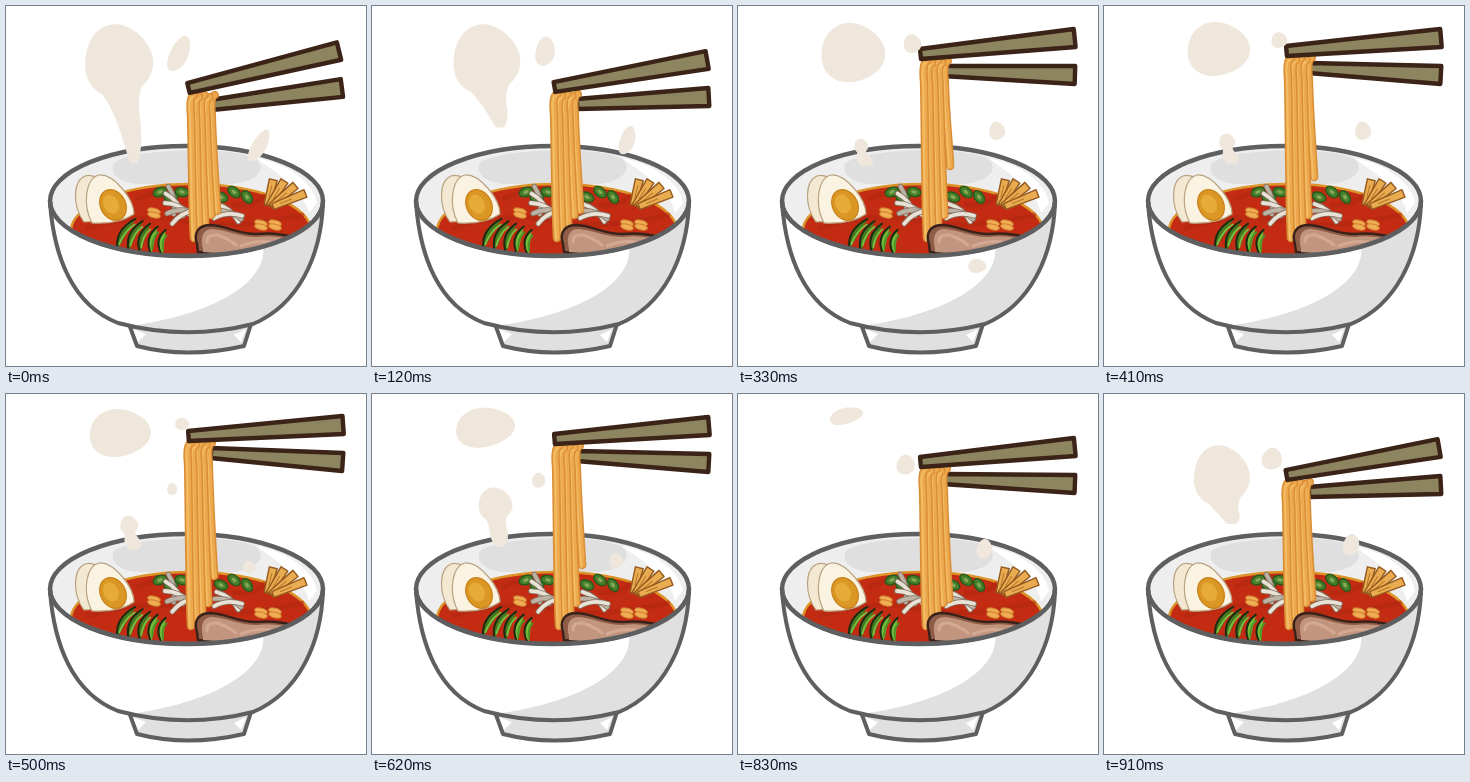
Write an HTML page that moves like this. It is 360 by 360 pixels and loops after 1 s.

```html
<!DOCTYPE html>
<html lang="en">
<head>
<meta charset="utf-8">
<title>Noodle bowl</title>
<style>
html, body { margin: 0; width: 100%; height: 100%; overflow: hidden; background: #fff; }
svg { display: block; width: 100%; height: 100%; }
</style>
</head>
<body>
<svg viewBox="0 0 360 360" fill="none" stroke-linecap="round" stroke-linejoin="round">
  <defs>
    <clipPath id="rimClip"><ellipse cx="180.5" cy="195" rx="136" ry="54"/></clipPath>
    <clipPath id="bodyClip"><path d="M44 197C48 250 66 299 112 317Q180 335 247 318C292 299 315 251 317 197A136.5 55 0 0 1 44 197Z"/></clipPath>
  </defs>

  <g id="inside" clip-path="url(#rimClip)">
    <rect x="40" y="138" width="280" height="114" fill="#eeeeef"/>
    <path d="M107 158C120 143 225 139 250 153C263 164 248 177 224 178H136C115 178 104 169 107 158Z" fill="#dfdfe0"/>
    <path d="M250 152C284 158 308 178 311 197L303 207C298 185 275 170 250 152Z" fill="#fff"/>
    <ellipse cx="185" cy="225" rx="120" ry="47" fill="#c32c13" stroke="#dc9428" stroke-width="2.5"/>
    <path d="M82 222Q135 205 180 215T296 209M132 193Q150 184 170 183M228 199Q250 200 258 190" stroke="#b02611" stroke-width="5" opacity=".5"/>
  </g>
  <ellipse cx="180.5" cy="195" rx="136.5" ry="55" stroke="#5e5f61" stroke-width="4.4"/>

  <g id="egg" stroke="#b8a380" stroke-width="1.2">
    <path d="M78 216C66 200 67 175 79 170C93 166 110 186 113 214Z" fill="#f3e8d2"/>
    <path d="M86 217C76 198 80 172 93 169C108 168 128 193 128 208C118 215 103 218 86 217Z" fill="#fbf3e2"/>
    <ellipse cx="107" cy="199" rx="12.5" ry="16" transform="rotate(-28 107 199)" fill="#da9723" stroke="#c9821b"/>
    <ellipse cx="105" cy="198" rx="7.5" ry="10" transform="rotate(-28 105 198)" fill="#e6ab38" stroke="none"/>
  </g>
  <g id="toppings"></g>

  <path id="lower" d="M0-5L132-9V9L0 5Z" fill="#8c855f" stroke="#3b2317" stroke-width="4.4"/>
  <g id="noodles"></g>
  <path id="upper" d="M0-5L155-9V9L0 5Z" fill="#8c855f" stroke="#3b2317" stroke-width="4.4"/>

  <g id="meat">
    <path d="M191 238C187 226 193 219 205 219C221 220 232 228 250 228Q270 226 287 231L268 243Q230 251 192 246Z" fill="#8f5d47" stroke="#39221a" stroke-width="2.4"/>
    <path d="M197 243C194 230 197 223 207 223C221 224 233 231 251 231Q268 229 282 233L262 243Q228 249 197 246Z" fill="#c2957f"/>
    <path d="M201 236Q201 228 211 229Q223 233 230 239M235 240Q249 234 264 236" stroke="#d3a994" stroke-width="3"/>
  </g>

  <g id="bowl">
    <path d="M123 318L131 340Q181 353 238 340L245 318Z" fill="#e1e0e0" stroke="#5e5f61" stroke-width="4"/>
    <path d="M127 323L140 328L132 336ZM228 329L240 323L235 336Z" fill="#fff"/>
    <g clip-path="url(#bodyClip)">
      <rect x="40" y="190" width="280" height="150" fill="#fff"/>
      <path d="M318 198Q295 232 257 240C262 277 206 309 124 320L180 340L260 328L320 260Z" fill="#e1e0e0"/>
    </g>
    <path d="M44 197C48 250 66 299 112 317Q180 335 247 318C292 299 315 251 317 197" stroke="#5e5f61" stroke-width="4"/>
    <path d="M44 195A136.5 55 0 0 0 317 195" stroke="#5e5f61" stroke-width="4.4"/>
  </g>
  <path id="steam" fill="#efe7dc"/>
</svg>

<script>
const $ = id => document.getElementById(id);
const repeat = (n, draw) => Array.from({ length: n }, (_, i) => draw(i)).join('');
const stroke = (d, color, width) => `<path d="${d}" stroke="${color}" stroke-width="${width}"/>`;
const put = (x, y, angle, shape) => `<g transform="translate(${x} ${y}) rotate(${angle})">${shape}</g>`;

// Toppings
function scallion(i) {
  const x = i < 3 ? 154 + i * 11 : 176 + i * 13, y = 186 + i % 2 * 5;
  return put(x, y, i * 15 - 20, `<ellipse rx="7" ry="4.5" fill="#477f2a" stroke="#245a1c" stroke-width="1.4"/>
    <ellipse rx="2.8" ry="1.6" fill="#86a95a"/>`);
}

function sprout(i) {
  const left = i < 5, k = left ? i : i - 5;
  const angle = left ? 75 - k * 27 : 35 - k * 22;
  const d = 'M-14 0Q0-5 14 2';
  return put(left ? 166 + k * 3 : 222, left ? 194 + k * 4 : 206 + k * 2, angle,
    stroke(d, '#827263', 5.4) + stroke(d, i % 3 ? '#e9e2d7' : '#bdb3a5', 3.8));
}

const bamboo = i => put(261 + i * 2, 199 + i / 2, -76 + i * 18,
  `<path d="M0-3L${26 + i * 3}-4V4L0 3Z" fill="#e9ac50" stroke="#94591d" stroke-width="1.4"/>
   <path d="M8 0H20" stroke="#b8772c"/>`);

const corn = i => put(148 + (i > 1) * 107 + (i > 3) * 14, 205 + (i > 1) * 12 + i % 2 * 4, 15,
  '<ellipse rx="6.5" ry="2.8" fill="#f0ae54" stroke="#d17c2c"/>');

function leaf(i) {
  const size = 33 - i * 2.5;
  const d = `M0 7Q${size * .3}-10 ${size}-6Q${size}6 ${size * .3} 9Z`;
  return put(107 + i * 11, 238 + i * 2, -38 - i * 4,
    `<path d="${d}" fill="${i > 2 ? '#70bb37' : '#467c20'}" stroke="#1c2c12" stroke-width="2"/>` +
    stroke(`M5 4Q${size / 2}-3 ${size - 4}-2`, i > 2 ? '#4d9229' : '#7cbf42', 1.8));
}

$('toppings').innerHTML = repeat(6, scallion) + repeat(8, sprout) +
  repeat(4, bamboo) + repeat(6, corn) + repeat(5, leaf);

// Lift, stick slope, end of the loose strand and sway, from dipped to raised
const poses = [[0, 37, 208, 0], [1, 27, 207, -3], [14, 15, 208, 0],
  [34, 16, 163, 1], [37, 13, 174, -1], [40, 11, 185, -3]];

function drawNoodles(top, loose, sway) {
  const ends = [235, 234, 228, 212, loose];
  const layers = ends.map((end, i) => {
    const a = 185 + sway + i * 5.2, b = 188 + sway + i * 5.8;
    const y = top + 3 + i % 2 * 2;
    const d = `M${a + 3} ${y}Q${a - 2} ${y + 1} ${a} ${y + 20}C${a + 1} ${y + 55} ${b - 2} ${end - 35} ${b} ${end - 3}`;
    return stroke(d, '#d98d35', 8.4) + stroke(d, '#eda94d', 5.4) +
      `<g transform="translate(-1 2)">${stroke(d, '#f3bd66', 2)}</g>`;
  });
  $('noodles').innerHTML = layers.reverse().join('');
}

function drawPose([lift, slope, loose, sway]) {
  const tip = 82 - lift;
  const turn = (dy, length) => -Math.asin(dy / length) * 180 / Math.PI;
  $('upper').setAttribute('transform', `translate(182.5 ${tip}) rotate(${turn(slope, 155)})`);
  $('lower').setAttribute('transform', `translate(205 ${tip + 17}) rotate(${turn(slope - 20, 132)})`);
  drawNoodles(tip + 4, loose, sway);
}

// Puffs: end time, then keys of time, x, y, rx, ry, tilt, tail bottom
const puffs = [
  { end: 830, keys: [[330, 123, 140, 7, 7, 0, 160], [500, 123, 131, 9, 9, 0, 156], [700, 123, 97, 22, 22, 0, 151]] },
  { end: 1910, keys: [[910, 117, 82, 28, 30, 0, 130], [1000, 112, 55, 34, 36, 0, 157],
    [1200, 115, 53, 33, 34, 0, 98], [1700, 112, 30, 29, 17, -10, 0], [1830, 108, 22, 17, 8, -15, 0]] },
  { end: 1620, keys: [[500, 166, 95, 5, 6, 0, 0], [910, 168, 65, 10, 11, 20, 0], [1000, 173, 48, 9, 19, 25, 0],
    [1200, 173, 44, 10, 12, 0, 0], [1500, 176, 30, 7, 6, 0, 0]] },
  { end: 1500, keys: [[500, 243, 173, 6, 6, 0, 0], [910, 247, 151, 8, 11, 15, 0],
    [1000, 253, 140, 7, 18, 30, 0], [1330, 259, 125, 8, 9, 0, 0]] },
  { end: 410, keys: [[330, 239, 260, 9, 7, 0, 0]] }
];

function sample(keys, t) {
  const i = keys.findLastIndex(k => k[0] <= t);
  const a = keys[i], b = keys[i + 1] || a;
  const f = a === b ? 0 : (t - a[0]) / (b[0] - a[0]);
  return a.map((v, k) => v + (b[k] - v) * f);
}

function puffPath([, x, y, rx, ry, tilt, bottom]) {
  const turn = tilt * Math.PI / 180, cos = Math.cos(turn), sin = Math.sin(turn);
  const head = Array.from({ length: 40 }, (_, i) => {
    const a = i * Math.PI / 20, r = 1 + .04 * Math.sin(3 * a + 1);
    const u = rx * r * Math.cos(a), v = ry * r * Math.sin(a);
    return `${(x + u * cos - v * sin).toFixed(1)} ${(y + u * sin + v * cos).toFixed(1)}`;
  });
  let d = `M${head.join('L')}Z`;
  if (bottom > y + ry) {
    const tip = 128, neck = y + ry * 1.25, low = (y + ry + bottom) / 2;
    const side = y + ry * .6, w = rx * .75;
    d += `M${x + w} ${side}C${x + rx * .4} ${neck} ${tip + 14} ${low} ${tip + 4} ${bottom}` +
      `H${tip - 4}C${tip - 14} ${low} ${x - rx * .1} ${neck} ${x - w} ${side}Z`;
  }
  return d;
}

function drawSteam(time) {
  const paths = puffs.flatMap(({ end, keys }) =>
    [time, time + 1000].filter(t => t >= keys[0][0] && t < end).map(t => puffPath(sample(keys, t))));
  $('steam').setAttribute('d', paths.join(''));
}

const beats = [0, 120, 200, 330, 410, 500, 620, 700, 830, 910];
let shown = -1;
function render(t) {
  const beat = beats.findLastIndex(b => b <= t);
  if (beat === shown) return;
  shown = beat;
  drawPose(poses[Math.min(beat, beats.length - beat)]);
  drawSteam(beats[beat]);
}

const begin = performance.now();
function tick() {
  render((performance.now() - begin) % 1000);
  requestAnimationFrame(tick);
}
tick();
</script>
</body>
</html>
```
